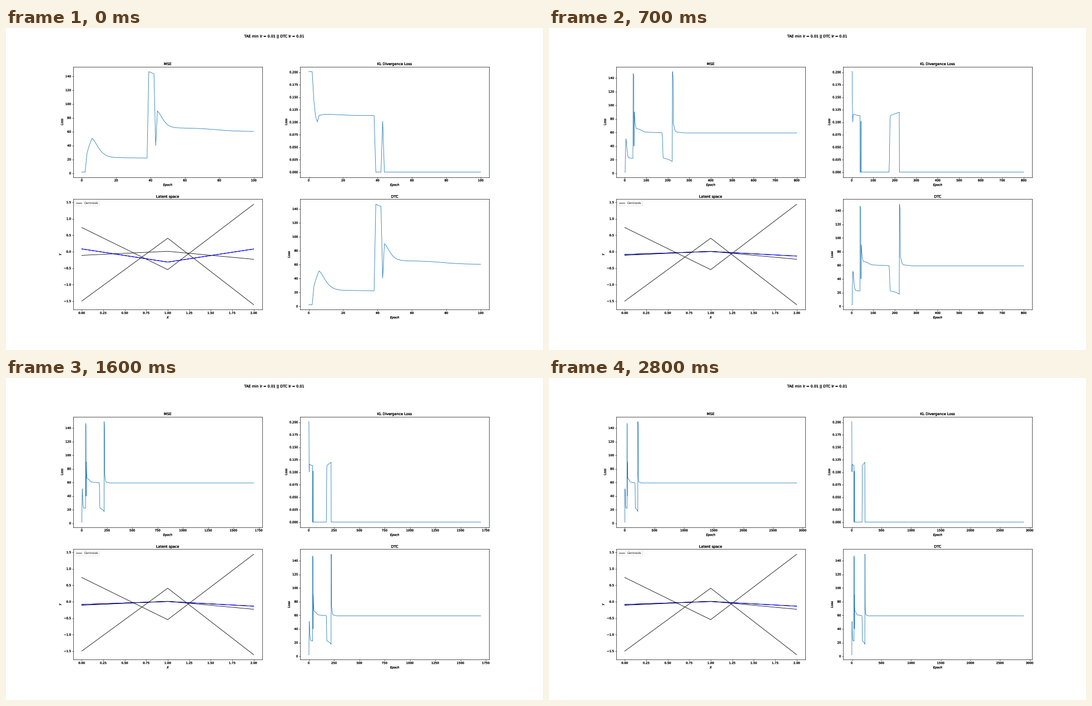
Write a matplotlib script that moves like this. It is 966 by 580 pixels and loops after 2.9 s.

```python
import numpy as np
import matplotlib.pyplot as plt
from matplotlib.animation import FuncAnimation
from matplotlib.patheffects import Normal, Stroke

DPI = 32
FRAMES, INTERVAL = 29, 100
EPOCHS_PER_FRAME = 100
K = 38.64 / DPI  # the layout is a 25 x 15 inch figure scaled to the stage

plt.rcParams.update({
    "font.family": "DejaVu Sans",
    "font.size": 10 * K,
    "axes.titlepad": 5 * K,
    "axes.labelpad": 6 * K,
    "axes.linewidth": 1.5,
    "lines.linewidth": 1.5 * K,
    "patch.linewidth": K,
    "text.hinting": "none",
})
for axis in ("xtick", "ytick"):
    plt.rcParams.update({
        f"{axis}.major.size": 3.5 * K,
        f"{axis}.major.pad": 3.5 * K,
        f"{axis}.major.width": 1.5,
    })

HEAVY = [Stroke(linewidth=0.4, foreground="black"), Normal()]
BLUE = "#1f77b4"
CENTROIDS = [(0.735, -0.545, 1.44), (-1.5, 0.41, -1.61), (-0.11, 0.012, -0.23)]


def fill(values, start, stop, func):
    """Set values for epochs start..stop, with t counted from start."""
    values[start:stop + 1] = func(np.arange(stop + 1 - start))


def decay(t, scale):
    return np.exp(-(t / scale) ** 1.5)


def step(t, center, width):
    return 1 / (1 + np.exp((center - t) / width))


def make_mse(n):
    v = np.full(n, 59.2)
    v[:3] = 1.6
    fill(v, 3, 6, lambda t: 28 + 22.5 * (t / 3) ** 0.8)
    fill(v, 6, 38, lambda t: 22.9 - 0.03 * t + 27.6 * decay(t, 4.9))
    fill(v, 39, 42, lambda t: 146.7 - 1.05 * t)
    v[43] = 40
    fill(v, 44, 173, lambda t: 65.6 - 0.012 * t - 4.6 * step(t, 34, 6) + 24.4 * decay(t, 4.2))
    fill(v, 174, 221, lambda t: 59 - 37 * step(t, 2.5, 0.8) - 4.7 * (t / 47) ** 2)
    fill(v, 222, 225, lambda t: 149.3 - 1.4 * t ** 2)
    fill(v, 226, 280, lambda t: 59.2 + 1.8 * (1 - t / 54) + 12 * decay(t, 6))
    return v


def make_kl(n):
    v = np.zeros(n)
    v[:3] = 0.201
    fill(v, 3, 5, lambda t: 0.1005 + 0.0425 * (1 - t / 2) ** 2)
    fill(v, 6, 38, lambda t: 0.1131 + 0.0026 * t / 5 * np.exp(1 - t / 5))
    v[43] = 0.102
    fill(v, 174, 221, lambda t: (0.1125 + 0.0073 * t / 47) * step(t, 2.3, 0.8))
    return v


TOTAL = FRAMES * EPOCHS_PER_FRAME + 1
MSE = make_mse(TOTAL)
KL = make_kl(TOTAL)
DTC = MSE + 3 * KL

fig, axes = plt.subplots(2, 2, figsize=(966 / DPI, 580 / DPI), dpi=DPI)
fig.subplots_adjust(left=0.125, right=0.9, bottom=0.125, top=0.88, wspace=0.2, hspace=0.2)
fig.suptitle("TAE min lr = 0.01 || DTC lr = 0.01", y=0.9785, path_effects=HEAVY)
LOSSES = [(axes[0, 0], "MSE", MSE), (axes[0, 1], "KL Divergence Loss", KL),
          (axes[1, 1], "DTC", DTC)]


def label(ax, title, xlabel, ylabel):
    ax.set_title(title, path_effects=HEAVY)
    ax.set_xlabel(xlabel, style="italic", path_effects=HEAVY)
    ax.set_ylabel(ylabel, style="italic", path_effects=HEAVY)
    for text in ax.get_xticklabels() + ax.get_yticklabels():
        text.set_path_effects(HEAVY)


def latent(frame):
    if frame == 0:
        return 0.085, -0.315, 0.082
    return -0.085, 0.006, -0.128 - 0.008 * min(frame / 12, 1)


def draw(frame):
    last = (frame + 1) * EPOCHS_PER_FRAME
    for ax, title, values in LOSSES:
        ax.clear()
        ax.plot(np.arange(last + 1), values[:last + 1], color=BLUE)
        label(ax, title, "Epoch", "Loss")

    ax = axes[1, 0]
    ax.clear()
    for _ in range(3):  # overlapping series make a heavier line
        ax.plot(range(3), latent(frame), color="blue")
    for i, centroid in enumerate(CENTROIDS):
        ax.plot(range(3), centroid, color="black", label=None if i else "Centroids")
    ax.legend(loc="upper left")
    label(ax, "Latent space", "X", "Y")
    return []


anim = FuncAnimation(fig, draw, frames=FRAMES, interval=INTERVAL, init_func=lambda: [],
                     repeat=True, repeat_delay=0, blit=False)
plt.show()
```
